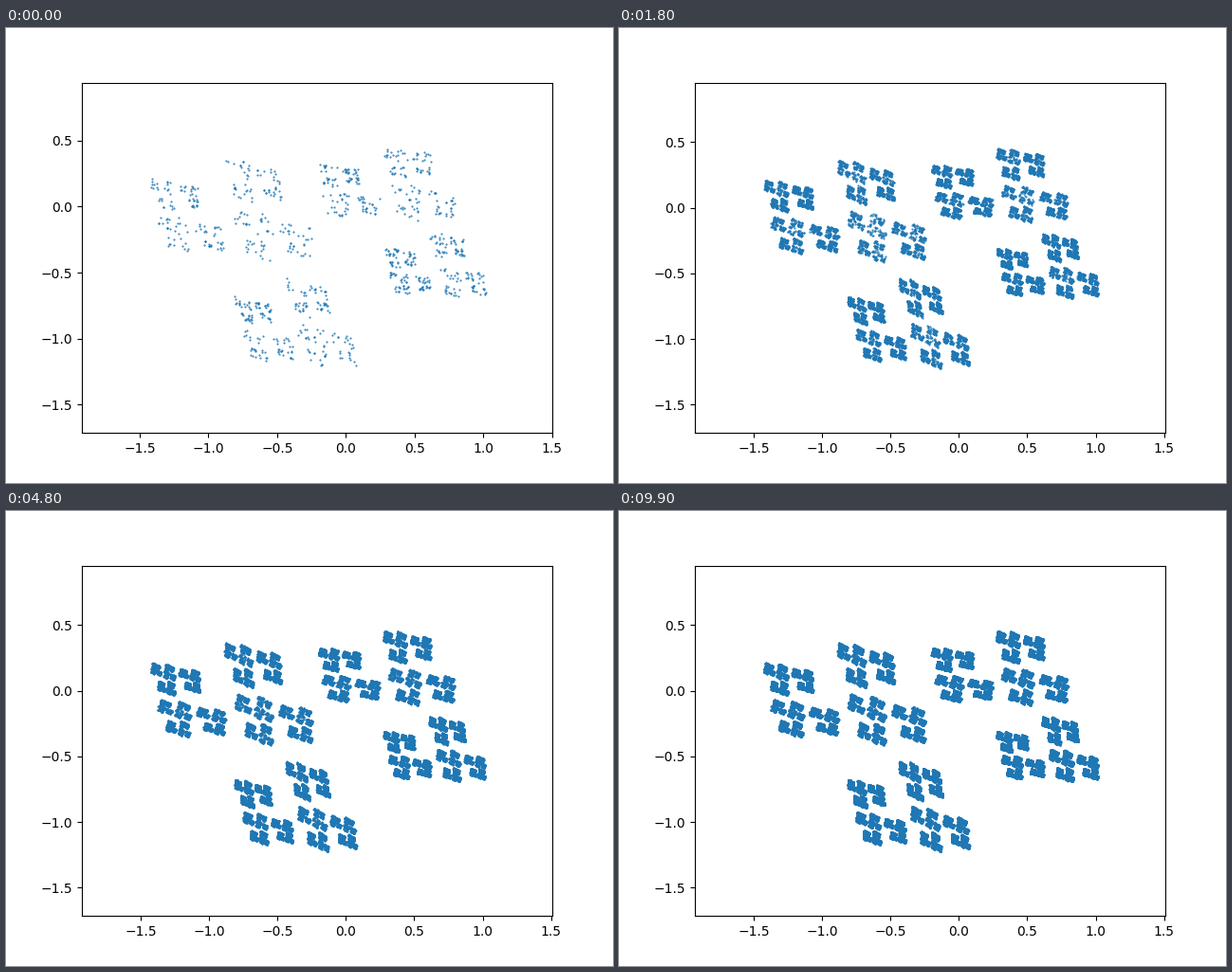
Animation of 640 by 480 pixels, one loop 10000 ms. Source, as a matplotlib script:

```python
import random

import numpy as np
import matplotlib.pyplot as plt
from matplotlib.animation import FuncAnimation

FRAMES = 100
INTERVAL = 100
STEP = 1000  # points added per frame
SETTLE = 2   # frame at which the view reaches its final limits

# Two contracting maps: x' = a x + b y + e, y' = c x + d y + f
MAPS = (
    (0.205, 0.800, -0.693, -0.333, -0.367, -0.647),
    (0.136, 0.672, -0.505, -0.220, 0.666, -0.276),
)

FIRST_VIEW = ((-1.921, 1.502), (-1.714, 0.938))
FULL_VIEW = ((-1.929, 1.509), (-1.715, 0.952))


def chaos_game(count, seed=4, burn_in=50):
    rng = random.Random(seed)
    x = y = 0.0
    points = []
    for i in range(count + burn_in):
        a, b, c, d, e, f = rng.choice(MAPS)
        x, y = a * x + b * y + e, c * x + d * y + f
        if i >= burn_in:
            points.append((x, y))
    return np.array(points)


points = chaos_game(FRAMES * STEP)

fig, ax = plt.subplots(figsize=(6.4, 4.8), dpi=100)
dots, = ax.plot([], [], ".", color="tab:blue", markersize=1)


def update(frame):
    shown = points[:(frame + 1) * STEP]
    dots.set_data(shown[:, 0], shown[:, 1])
    xlim, ylim = FIRST_VIEW if frame < SETTLE else FULL_VIEW
    ax.set_xlim(xlim)
    ax.set_ylim(ylim)
    return dots,


anim = FuncAnimation(fig, update, frames=FRAMES, interval=INTERVAL,
                     init_func=lambda: update(0), repeat=True,
                     repeat_delay=0, blit=False)
plt.show()
```
